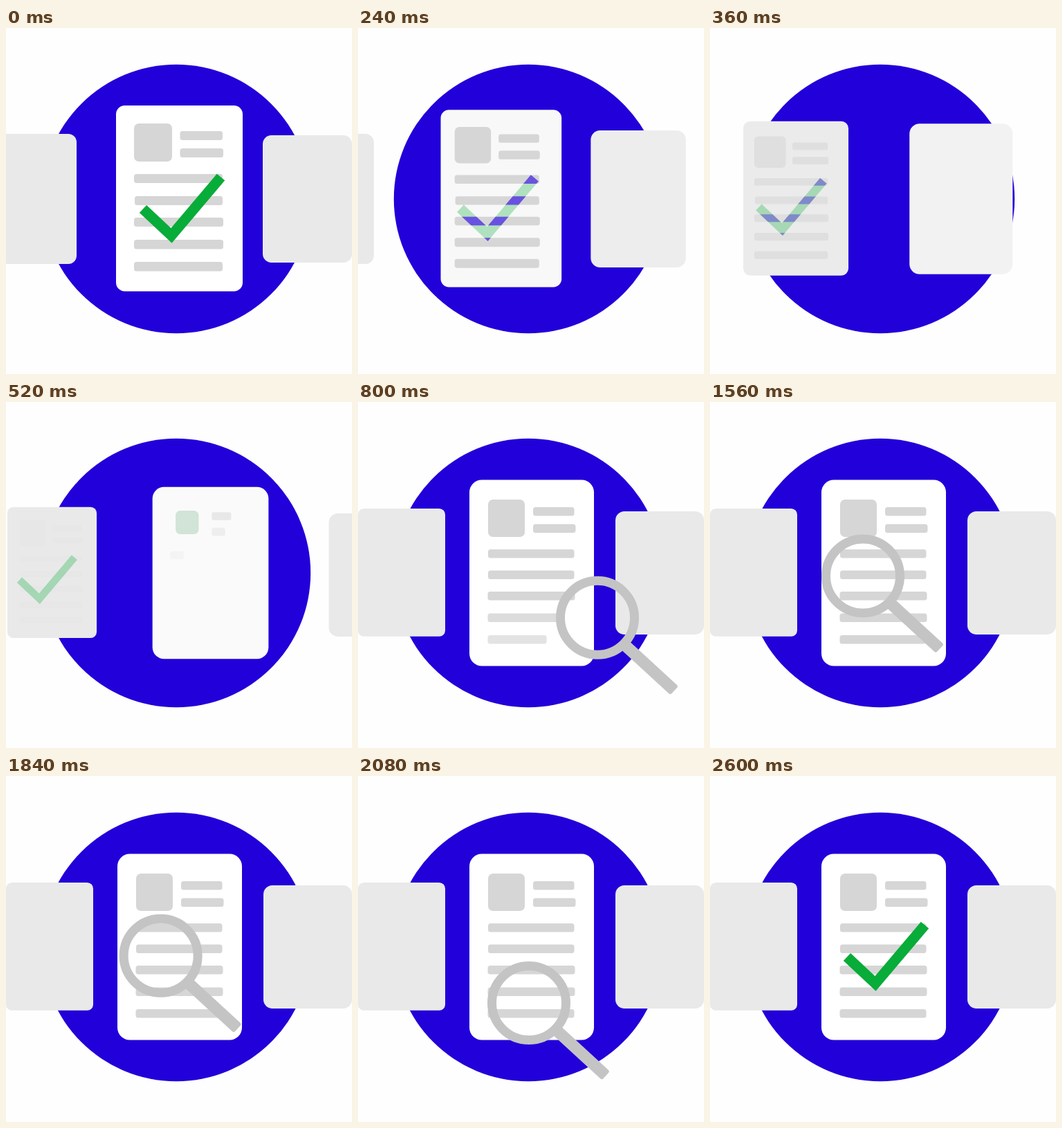
Recreate the animation shown at these times as an HTML page. Size 500 by 500 pixels, loop 2.92 s.

```html
<!DOCTYPE html>
<html lang="en">
<head>
<meta charset="utf-8">
<title>Document review</title>
<style>
html, body { margin: 0; width: 100%; height: 100%; overflow: hidden; background: #fefefe; }
svg { display: block; width: 100%; height: 100%; }
.check { fill: none; stroke: #08ac38; stroke-width: 15; }
.lines { fill: #d6d6d6; }
</style>
</head>
<body>
<svg viewBox="0 0 500 500">
  <defs>
    <clipPath id="lineClip"></clipPath>
  </defs>
  <circle cx="246" cy="247" r="194.2" fill="#2200d9"/>
  <rect id="left" y="153" width="129" height="188" rx="12" fill="#e9e9e9"/>
  <rect id="right" width="128" height="178" rx="13" fill="#e9e9e9"/>

  <g id="oldDoc">
    <rect id="oldPage" x="159" y="112" width="183" height="268.5" rx="12.5"/>
    <g id="oldLines" class="lines"></g>
    <polyline id="oldCheck" class="check" points="198,261.5 239,300 310.5,215.5"/>
    <g id="overlap">
      <g clip-path="url(#lineClip)">
        <polyline id="tint" class="check" style="stroke:#6a52e0" points="198,261.5 239,300 310.5,215.5"/>
      </g>
    </g>
  </g>

  <rect id="newPage"/>
  <g id="newLines" class="lines"></g>

  <g id="glass" fill="#c4c4c4">
    <rect x="-4" y="-8.5" width="98" height="17" rx="3" transform="translate(42 41.5) rotate(42.6)"/>
    <circle r="53.5" fill="none" stroke="#c4c4c4" stroke-width="13"/>
  </g>
  <polyline id="newCheck" class="check" points="198,261.5 239,300 310.5,215.5"/>
</svg>
<script>
const LOOP = 2920, STEP = 40;
const el = id => document.getElementById(id);
const set = (node, attrs) => { for (const k in attrs) node.setAttribute(k, attrs[k]); };
const mix = (a, b, p) => a + (b - a) * p;
const ramp = (t, a, b) => Math.min(1, Math.max(0, (t - a) / (b - a)));
// symmetric ease-in-out of power k
const ease = (t, a, b, k = 2) => {
  const x = ramp(t, a, b);
  return x < 0.5 ? (2 * x) ** k / 2 : 1 - (2 - 2 * x) ** k / 2;
};
const gray = v => `rgb(${v},${v},${v})`;
const bend = (a, c, b, u) =>
  [0, 1].map(i => (1 - u) ** 2 * a[i] + 2 * u * (1 - u) * c[i] + u * u * b[i]);

// x, y, width, height
const oldRows = [
  [185, 138, 55, 55], [251.5, 149, 61.5, 13], [251.5, 174, 62.5, 13],
  [185, 211, 128, 13], [186, 243, 127, 13], [185, 274, 129, 13],
  [185, 306, 129, 13.5], [185, 338, 128, 13.5]
];
const newRows = [
  [188, 141, 53, 54], [253, 152, 59.5, 12.5], [253, 176.5, 61.5, 12.5],
  [188, 213, 124.5, 12.5], [188, 243.5, 124.5, 12.5], [187.5, 274, 126, 12.5],
  [187.5, 305.5, 126, 12.5], [187.5, 337, 125, 12.5]
];

function addRows(parent, rows) {
  return rows.map(([x, y, width, height], i) => {
    const r = document.createElementNS('http://www.w3.org/2000/svg', 'rect');
    set(r, { x, y, width, height, rx: i ? 3.5 : 7 });
    el(parent).appendChild(r);
    return r;
  });
}
addRows('oldLines', oldRows);
const clipRows = addRows('lineClip', oldRows);
const bars = addRows('newLines', newRows);

function drawOldDoc(t) {
  const move = ease(t, 40, 590, 2.4);
  const scale = mix(1, 0.6885, ease(t, 40, 660, 2.8));
  const shift = `translate(${-26 * move * (1 - move) / scale} 0)`;
  const lag = `translate(${-10 * (1 - (1 - move) ** 8) / scale} 0)`;
  const fade = mix(1, 0.05, ramp(t, 260, 480)) * (1 - ramp(t, 520, 640));
  set(el('left'), { x: -27 - 340 * move });
  set(el('oldDoc'), {
    transform: `translate(${mix(250.5, 63, move)} 246.5) scale(${scale}) translate(-250.5 -246.5)`
  });
  set(el('oldPage'), { fill: gray(mix(255, 233, ease(t, 40, 500, 3))) });
  set(el('oldLines'), { transform: shift, opacity: fade });
  clipRows.forEach(r => set(r, { transform: shift }));
  set(el('oldCheck'), {
    transform: lag,
    opacity: mix(1, 0.3, ramp(t, 0, 220)) * (1 - ramp(t, 540, 680))
  });
  set(el('tint'), { transform: lag });
  set(el('overlap'), { opacity: ramp(t, 0, 200) * (1 - ramp(t, 280, 460)) });
}

function drawNewDoc(t) {
  const p = ease(t, 20, 786);
  const cx = mix(435.5, 251, p), w = mix(129, 180, p), h = mix(184, 269, p);
  set(el('newPage'), {
    x: cx - w / 2, y: 247 - h / 2, width: w, height: h,
    rx: mix(12.5, 18, p), fill: gray(mix(233, 255, p))
  });
  set(el('newLines'), {
    transform: `translate(${cx} 247) scale(${h / 269}) translate(-251 -247)`
  });
  bars.forEach((bar, i) => {
    const [x, y, width, height] = newRows[i];
    const g = ramp(t, 360 + 40 * i, 595 + 40 * i);
    if (i) set(bar, { width: width * g, opacity: g });
    else {
      const c = ramp(t, 520, 620);
      set(bar, {
        x: x + width * (1 - g) / 2, y: y + height * (1 - g) / 2,
        width: width * g, height: height * g, opacity: g,
        fill: `rgb(${mix(191, 214, c)},${mix(219, 214, c)},${mix(200, 214, c)})`
      });
    }
  });
  set(el('right'), { x: mix(764, 372, p), y: mix(170, 158, p) });
}

function glassAt(t) {
  if (t < 1120) return bend([600, 400], [330, 370], [220, 170], 1 - (1 - ramp(t, 640, 1110)) ** 2);
  if (t < 1780) {
    const p = ease(t, 1120, 1620, 3);
    return [mix(220, 221, p), mix(170, 252, p)];
  }
  if (t < 2140) {
    const p = ease(t, 1770, 2080);
    return [mix(221, 247, p), mix(252, 328, p)];
  }
  return bend([247, 328], [371, 329], [575, 565], ramp(t, 2140, 2560) ** 1.25);
}

function draw(t) {
  drawOldDoc(t);
  drawNewDoc(t);
  set(el('glass'), {
    transform: `translate(${glassAt(t).join(' ')})`,
    visibility: t > 640 && t < 2560 ? 'visible' : 'hidden'
  });
  const pop = ramp(t, 2330, 2600);
  const s = mix(2.3, 1, pop);
  set(el('newCheck'), {
    transform: `translate(254.5 261) scale(${s}) translate(-254.5 -261)`,
    opacity: pop
  });
}

const start = performance.now();
function tick() {
  const t = (performance.now() - start) % LOOP;
  draw(Math.min(2600, Math.floor(t / STEP) * STEP));
  requestAnimationFrame(tick);
}
draw(0);
requestAnimationFrame(tick);
</script>
</body>
</html>
```
